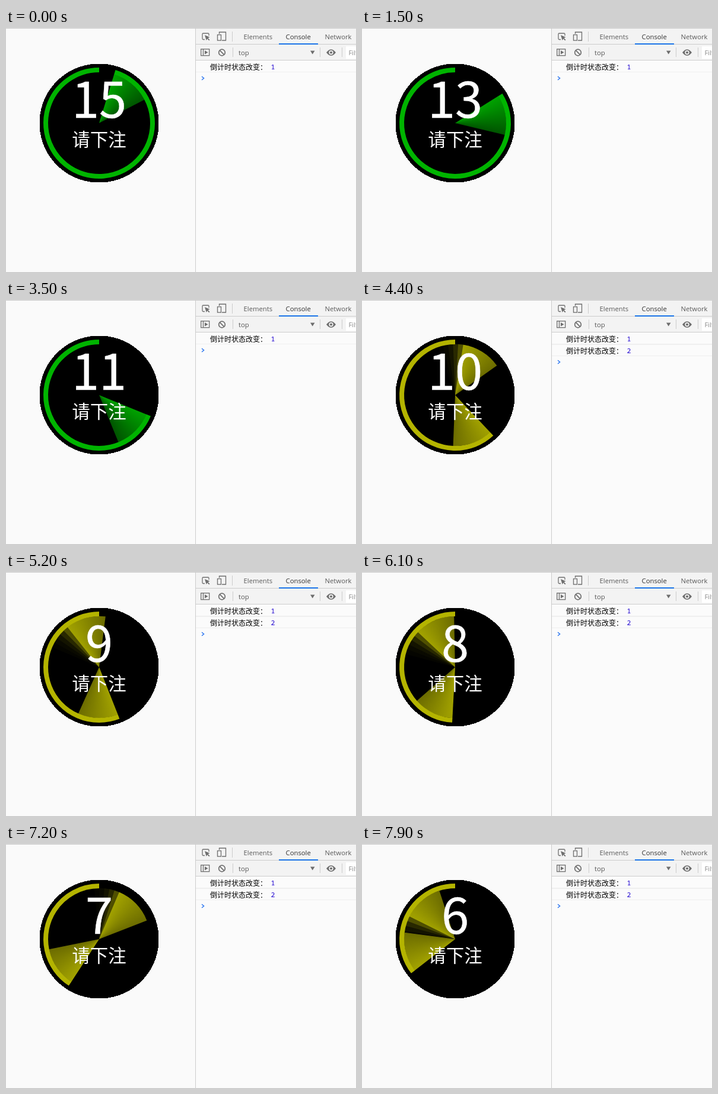
An HTML page with a canvas that plays this animation: 590x413 px, repeating every 8 s.

```html
<!DOCTYPE html>
<html lang="zh">
<head>
<meta charset="utf-8">
<title>Countdown</title>
<style>
  html, body { margin: 0; width: 100%; height: 100%; overflow: hidden; background: #fafafa; }
  canvas, svg { position: absolute; left: 0; top: 0; width: 590px; height: 413px; display: block; }
  text { white-space: pre; }
  .ui { font: 11.3px "Open Sans", sans-serif; fill: #5a5a5a; }
  .log { font: 12px "Noto Sans CJK SC", "Noto Sans CJK", sans-serif; fill: #000; }
  .num { font: 11.5px "Noto Sans Mono", monospace; fill: #1c00cf; }
  .dial { font-family: "Noto Sans CJK SC", "Noto Sans CJK", sans-serif; fill: #fff; text-anchor: middle; }
  .icon { fill: none; stroke: #6e6e6e; stroke-width: 1.3; }
  .solid { fill: #6e6e6e; }
</style>
</head>
<body>
<canvas id="stage" width="590" height="413"></canvas>
<svg viewBox="0 0 590 413">
  <rect width="590" height="1" fill="#cbcbcb"/>

  <text class="dial" id="count" x="157" y="152" font-size="83" stroke="#fff" stroke-width="0.6">15</text>
  <text class="dial" x="157" y="199.700" font-size="30.500" font-weight="500">请下注</text>

  <rect x="320" y="1" width="270" height="53" fill="#f3f3f3"/>
  <rect x="320" y="55" width="270" height="358" fill="#fbfbfb"/>
  <g fill="#cccccc">
    <rect x="319" y="1" width="1" height="412"/>
    <rect x="320" y="27" width="270" height="1"/>
    <rect x="320" y="54" width="270" height="1"/>
    <rect x="381" y="6" width="1" height="17"/>
    <rect x="382" y="33" width="1" height="16"/>
    <rect x="529" y="33" width="1" height="16"/>
    <rect x="566" y="33" width="1" height="16"/>
  </g>
  <rect x="573" y="31" width="17" height="21" fill="#fff"/>

  <g class="icon">
    <path d="M335 19.5H332.5Q331 19.5 331 18V10.500Q331 9 332.500 9H340.500Q342 9 342 10.500V13"/>
    <path d="M359.500 10V7H370.500V21H364"/>
    <rect x="356.500" y="11.500" width="6" height="9.500"/>
    <rect x="328.700" y="35.700" width="14" height="11"/>
    <path d="M332.500 36V47"/>
    <circle cx="364" cy="41.500" r="5.300" stroke-width="1.700"/>
    <path d="M360.300 37.800L367.700 45.200" stroke-width="1.700"/>
  </g>
  <g class="solid">
    <path d="M335 12L343.500 15.500L340.500 17L343.500 20L342.200 21.200L339.300 18.300L337.700 21Z"/>
    <path d="M335 38L340.500 41.200L335 44.500Z"/>
    <path d="M513 38.500H520.500L516.700 44.500Z"/>
    <path d="M540 41.500Q548 31 556 41.500Q548 52 540 41.500Z"/>
  </g>
  <circle cx="548" cy="41.500" r="3.700" fill="#f3f3f3"/>
  <circle cx="548" cy="41.500" r="2" class="solid"/>

  <text class="ui" x="400.500" y="19">Elements</text>
  <text class="ui" x="471.500" y="19" style="fill:#333">Console</text>
  <text class="ui" x="537.500" y="19">Network</text>
  <rect x="460" y="26" width="66" height="2" fill="#1a73e8"/>
  <text class="ui" x="392" y="46">top</text>
  <text class="ui" x="577.500" y="46" style="fill:#8a8a8a">Filter</text>

  <g>
    <text class="log" x="344" y="70.500">倒计时状态改变：</text>
    <text class="num" x="446.500" y="70">1</text>
    <rect x="320" y="74" width="270" height="1" fill="#efefef"/>
  </g>
  <g id="second">
    <rect x="320" y="75" width="270" height="1" fill="#efefef"/>
    <text class="log" x="344" y="90.500">倒计时状态改变：</text>
    <text class="num" x="446.500" y="90">2</text>
    <rect x="320" y="94" width="270" height="1" fill="#efefef"/>
  </g>
  <path id="prompt" d="M330 82L333.500 85L330 88" fill="none" stroke="#367cf1" stroke-width="1.600"/>
</svg>
<script>
const LOOP = 8000, TICK = 100;
const CX = 157, CY = 161, DISK = 100, RING = 90, INNER = 86.3;
const SPAN = 45.5;          // sector width in degrees
const TOTAL = 15, WARN = 10;
const ctx = document.getElementById('stage').getContext('2d');
const count = document.getElementById('count');
const second = document.getElementById('second');
const prompt = document.getElementById('prompt');

// degrees clockwise from the top
const rad = deg => (deg - 90) * Math.PI / 180;
const tint = (v, warn) => `rgb(${warn ? Math.round(v) : 0},${Math.round(v)},0)`;

// black disk with a hard, stepped edge
function disk() {
  ctx.fillStyle = '#000';
  for (let y = -DISK; y < DISK; y++) {
    const near = Math.min(Math.abs(y), Math.abs(y + 1));
    const half = Math.ceil(Math.sqrt(DISK * DISK - near * near));
    ctx.fillRect(CX - half, CY + y, 2 * half, 1);
  }
}

function sector(from, level, warn) {
  const near = tint(162 * level, warn);
  const far = tint((warn ? 108 : 85) * level, warn);
  const fill = ctx.createConicGradient(rad(from), CX, CY);
  fill.addColorStop(0, near);
  fill.addColorStop(SPAN / 360, far);
  fill.addColorStop(0.5, far);
  fill.addColorStop(0.51, near);
  fill.addColorStop(1, near);
  ctx.fillStyle = fill;
  ctx.beginPath();
  ctx.moveTo(CX, CY);
  ctx.arc(CX, CY, INNER, rad(from), rad(from + SPAN));
  ctx.fill();
}

function draw(ms) {
  const t = Math.floor(ms / TICK) * TICK / 1000;
  const head = 17 + 27.22 * t;
  const left = Math.ceil(TOTAL - head * TOTAL / 360);
  const warn = left <= WARN;

  ctx.clearRect(0, 0, 590, 413);
  disk();

  ctx.globalCompositeOperation = 'lighten';
  sector(head, 1, warn);
  if (warn) {
    // fast sweep with a fading tail
    const sweep = 54.6 + 390.7 * (t - 4.4) - SPAN;
    for (let k = 5; k >= 0; k--) sector(sweep - 5.7 * k, 0.5 ** k, true);
  }
  ctx.globalCompositeOperation = 'source-over';

  ctx.strokeStyle = tint(180, warn);
  ctx.lineWidth = 8;
  ctx.beginPath();
  ctx.arc(CX, CY, RING, rad(head), rad(360));
  ctx.stroke();

  count.textContent = left;
  second.style.display = warn ? '' : 'none';
  prompt.setAttribute('transform', `translate(0 ${warn ? 20 : 0})`);
}

const start = performance.now();
function frame() {
  draw((performance.now() - start) % LOOP);
  requestAnimationFrame(frame);
}
draw(0);
requestAnimationFrame(frame);
</script>
</body>
</html>
```
